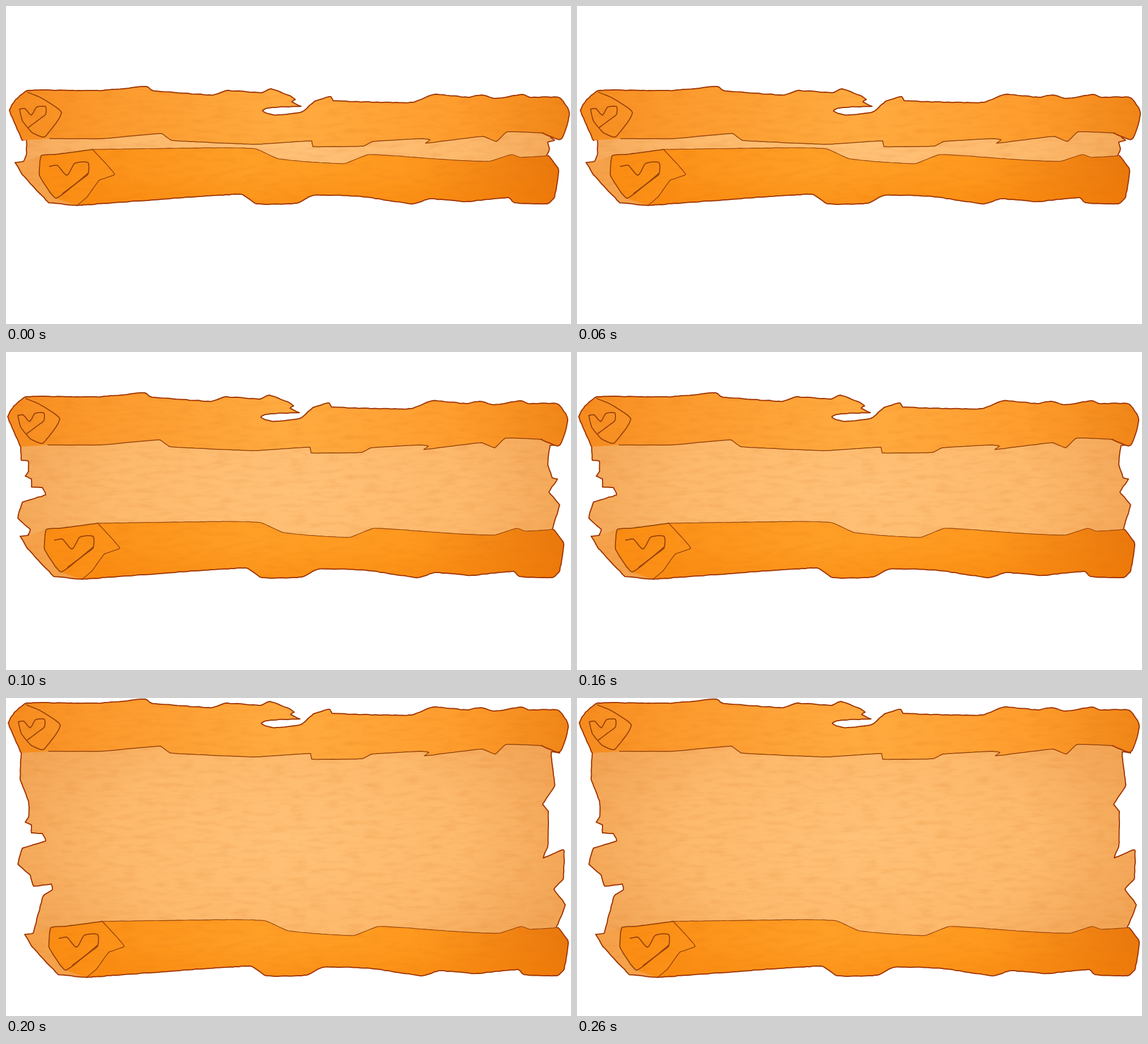
An HTML page that plays this animation: 998 px wide and 561 px high, repeating every 0.3 s.

```html
<!DOCTYPE html>
<html lang="en">
<head>
<meta charset="utf-8">
<title>Unrolling scroll</title>
<style>
  html, body { margin: 0; width: 100%; height: 100%; overflow: hidden; background: #fff; }
  svg { display: block; }
  polyline { stroke-linejoin: round; stroke-linecap: round; }
</style>
</head>
<body>
<svg width="998" height="561" viewBox="0 0 998 561">
  <defs>
    <linearGradient id="upper" gradientUnits="userSpaceOnUse" x1="5" y1="0" x2="995" y2="0">
      <stop offset="0" stop-color="#f68b1e"/>
      <stop offset=".15" stop-color="#fc992c"/>
      <stop offset=".5" stop-color="#ffab40"/>
      <stop offset=".8" stop-color="#ff9d2e"/>
      <stop offset="1" stop-color="#f08617"/>
    </linearGradient>
    <linearGradient id="lower" gradientUnits="userSpaceOnUse" x1="75" y1="0" x2="993" y2="0">
      <stop offset="0" stop-color="#fb8c12"/>
      <stop offset=".4" stop-color="#ff9f26"/>
      <stop offset=".7" stop-color="#ff991e"/>
      <stop offset="1" stop-color="#ea780c"/>
    </linearGradient>
    <linearGradient id="shade" x1="0" y1="0" x2="0" y2="1">
      <stop offset=".4" stop-color="#f57c00" stop-opacity="0"/>
      <stop offset="1" stop-color="#f57c00" stop-opacity=".35"/>
    </linearGradient>
    <radialGradient id="paper" gradientUnits="userSpaceOnUse" cx="0" cy="0" r="1"
        gradientTransform="translate(500 250) scale(520 290)">
      <stop offset="0" stop-color="#ffc278"/>
      <stop offset=".6" stop-color="#fdb96c"/>
      <stop offset="1" stop-color="#f2a556"/>
    </radialGradient>
    <filter id="grain" x="0" y="0" width="1" height="1" color-interpolation-filters="sRGB">
      <feTurbulence type="fractalNoise" baseFrequency=".03 .12" numOctaves="3" seed="4"/>
      <feColorMatrix values="0 0 0 0 .82  0 0 0 0 .4  0 0 0 0 .05  .3 0 0 0 -.13"/>
      <feComposite in2="SourceGraphic" operator="atop"/>
    </filter>
  </defs>
  <g id="sheets"></g>
  <g id="bottom"></g>
  <g id="top"></g>
</svg>
<script>
const $ = id => document.getElementById(id);

let seed = 7;
const random = () => (seed = seed * 16807 % 2147483647) / 2147483647;

// Draws a slightly worn edge through key points; bend rounds the corners
function edge(text, bend = 0, wear = 0.5) {
  const keys = text.trim().split(/\s+/).map(pair => pair.split(',').map(Number));
  const tangent = i => {
    const a = keys[Math.max(0, i - 1)], b = keys[Math.min(keys.length - 1, i + 1)];
    const length = Math.hypot(b[0] - a[0], b[1] - a[1]);
    return [0, 1].map(k => bend * (b[k] - a[k]) / length);
  };
  const points = [keys[0]];
  for (let i = 1; i < keys.length; i++) {
    const p = keys[i - 1], q = keys[i], u = tangent(i - 1), v = tangent(i);
    const length = Math.hypot(q[0] - p[0], q[1] - p[1]);
    const count = Math.ceil(length / 6);
    for (let n = 1; n <= count; n++) {
      const t = n / count, s = 1 - t, rough = n < count ? wear : 0;
      points.push([0, 1].map(k =>
        p[k] * s * s * (1 + 2 * t) + q[k] * t * t * (3 - 2 * t) +
        length * s * t * (u[k] * s - v[k] * t) + rough * (2 * random() - 1)));
    }
  }
  return points;
}

const fill = (points, paint, extra = 'filter="url(#grain)"') =>
  `<polyline points="${points.join(' ')}" fill="${paint}" ${extra}/>`;
const line = (points, width = 1.3, color = '#94420a') =>
  `<polyline points="${points.join(' ')}" fill="none" stroke="${color}" stroke-width="${width}"/>`;
const rim = points => line(points, 2, '#a03604');
const back = points => [...points].reverse();

// Crooked open heart in units of its width
const heart = (x, y, size) =>
  edge('0,0 .2,-.03 .45,.23 .65,-.08 1,-.1 1,.2 .85,.32 .34,.7'.replace(/(\S+),(\S+)/g,
    (_, dx, dy) => `${x + dx * size},${y + dy * size}`), 0.5, 0);

function drawTop() {
  const left = edge('29,237 6,184 17,165 38,149 120,149 170,149 248,142 259,149 366,157 390,149 ' +
    '452,153 468,146 498,157 511,165 505,169 521,177', 0.35);
  const right = edge('521,177 470,179 453,185 472,192 522,187 545,168 574,160 578,167 718,170 756,156 ' +
    '815,161 840,157 865,163 912,156 925,161 978,162 995,188 980,235 948,224', 0.5);
  const lip = edge('948,224 885,222 866,239 843,230 741,242 749,236 734,234 648,239 632,247 ' +
    '542,248 540,238 440,244 292,237 275,225 170,234 77,234', 0.3, 0.2);
  const curl = edge('24,182 29,203 47,224 68,231 98,188 62,162 38,152', 0.4, 0.2);
  return fill([...left, ...right, ...lip], 'url(#upper)') +
    line(lip, 1.5) + rim(left) + rim(right) + line(curl, 1.8) + line(heart(24, 182, 46), 1.8);
}

function drawBottom() {
  const flap = edge('48,415 33,417 47,440 92,488 142,493');
  const lip = edge('170,394 400,391 458,393 500,411 614,419 658,403 780,411 870,415 910,403 925,408 975,405',
    0.4, 0.2);
  const under = edge('975,405 993,430 985,480 973,490 915,488 905,479 830,486 765,481 736,490 ' +
    '645,477 560,475 530,489 460,490 432,473 142,493', 0.4);
  const tip = edge('170,394 209,438 182,448 160,478 142,493', 0.2, 0.2);
  const curl = edge('162,436 105,480 76,440 79,405 103,403 170,394', 0.3, 0.2);
  const body = [...lip, ...under, ...back(tip)];
  return fill([...flap, ...back(tip), [79, 405]], '#f5a24a') +
    fill([...curl, ...tip, [105, 480]], 'url(#lower)') +
    fill(body, 'url(#lower)') + fill(body, 'url(#shade)', '') +
    rim(flap) + line(lip, 1.2) + rim(under) + line(tip, 1.4) +
    line(curl, 1.8) + line(heart(94, 424, 68), 1.8);
}

// Roll offsets and torn sides of the paper in each pose
const tear = '40,210 34,219 45,224 45,238 64,239 70,252 29,265 21,293 43,313';
const poses = [
  { top: [0, 0], bottom: [-17, -141],
    left: '29,237 36,236 36,262 31,275',
    right: '962,232 969,237 957,240 960,252 954,267' },
  { top: [-3, -70], bottom: [-8, -92],
    left: `26,167 27,191 39,192 ${tear} 39,323`,
    right: '976,165 961,165 957,198 965,222 974,224 959,247 978,270 964,315' },
  { top: [-2, -140], bottom: [0, 0],
    left: `27,97 25,143 40,183 ${tear} 49,332 80,328 82,338 66,349 48,415`,
    right: '978,97 963,95 969,155 948,188 958,200 957,262 949,282 985,268 984,320 968,337 988,365 972,405' }
];

function drawSheet({ top, bottom, left, right }) {
  const a = edge(left, 0.2), b = edge(right, 0.2);
  const y1 = 212 + top[1], y2 = 440 + bottom[1]; // tucked behind the rolls
  return `<g>${fill([...a, [100, y2], [940, y2], ...back(b), [945, y1], [60, y1]], 'url(#paper)')}` +
    `${rim(a)}${rim(b)}</g>`;
}

$('top').innerHTML = drawTop();
$('bottom').innerHTML = drawBottom();
$('sheets').innerHTML = poses.map(drawSheet).join('');

const start = performance.now();
function draw(now) {
  const step = Math.floor(Math.max(0, now - start) / 100) % poses.length;
  for (const id of ['top', 'bottom']) $(id).setAttribute('transform', `translate(${poses[step][id]})`);
  [...$('sheets').children].forEach((sheet, i) => sheet.setAttribute('display', i === step ? 'inline' : 'none'));
  requestAnimationFrame(draw);
}
draw(start);
</script>
</body>
</html>
```
